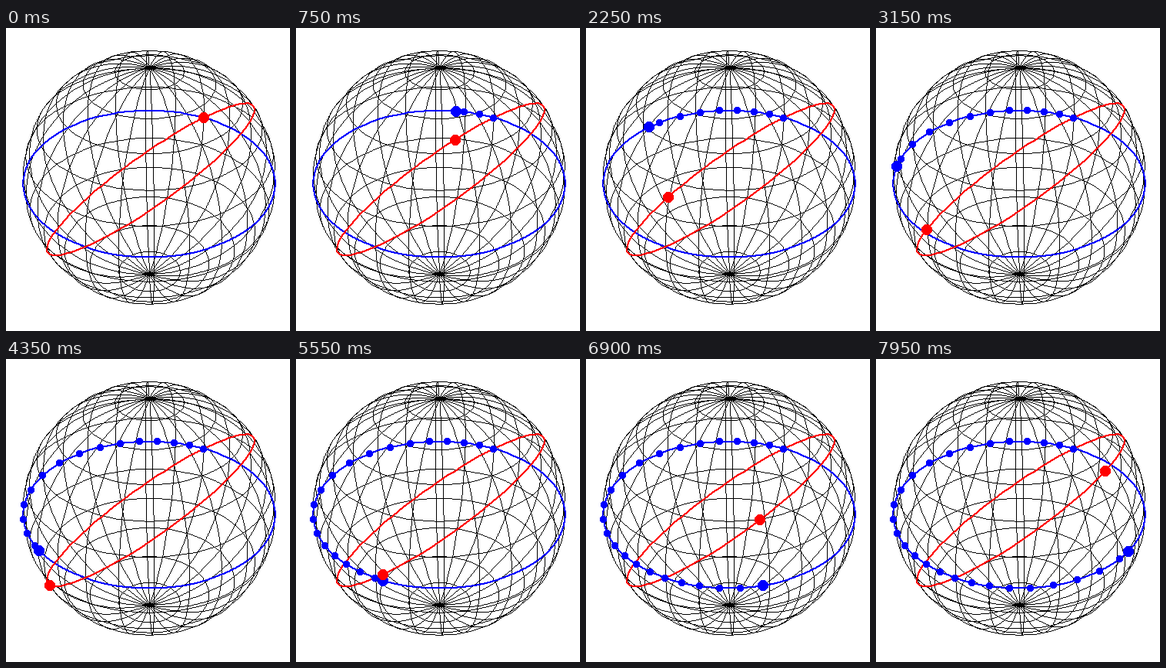
Animation of 369 by 392 pixels, one loop 8000 ms. Source, as a matplotlib script:

```python
import numpy as np
import matplotlib.pyplot as plt
from matplotlib.animation import FuncAnimation

WIDTH, HEIGHT, DPI = 369, 392, 100
CENTER_X, CENTER_Y, RADIUS = 186, 194, 164
DISTANCE = 9                          # camera distance in sphere radii
ELEVATION = np.arctan(np.sqrt(0.5))
NODE = np.radians(-62)                # where ecliptic and equator cross
OBLIQUITY = np.radians(40)
STEP = np.radians(5)
INTERVAL, TICKS_PER_STEP, FRAMES = 50, 3, 160
SMALL_DOT, BIG_DOT = 9, 14
BLUE, RED = "#0000ff", "#ff0000"


def project(lon, lat):
    """Perspective view of a point on the sphere, in stage pixels."""
    right = np.cos(lat) * np.cos(lon)
    front = np.cos(lat) * np.sin(lon)
    up = np.sin(lat)
    s, c = np.sin(ELEVATION), np.cos(ELEVATION)
    depth = c * front + s * up
    scale = RADIUS * np.sqrt(DISTANCE**2 - 1) / (DISTANCE - depth)
    return CENTER_X + scale * right, CENTER_Y - scale * (c * up - s * front)


def ecliptic(angle):
    """Longitude and latitude of the sun after moving by angle."""
    ascension = np.arctan2(np.sin(angle) * np.cos(OBLIQUITY), np.cos(angle))
    latitude = -np.arcsin(np.sin(angle) * np.sin(OBLIQUITY))
    return NODE - ascension, latitude


fig = plt.figure(figsize=(WIDTH / DPI, HEIGHT / DPI), dpi=DPI, facecolor="white")
ax = fig.add_axes([0, 0, 1, 1])
ax.set(xlim=(0, WIDTH), ylim=(HEIGHT, 0))
ax.axis("off")


def pixels(color, points=((), ())):
    """Hard-edged single pixels, one for each point."""
    return ax.plot(*points, ",", color=color, antialiased=False)[0]


def trace(x, y):
    """Pixels of a polyline, one per step along the longer axis."""
    points = np.rint(np.column_stack([x, y]))
    parts = []
    for start, end in zip(points[:-1], points[1:]):
        count = int(abs(end - start).max()) + 1
        parts.append(np.rint(np.linspace(start, end, count)))
    return np.unique(np.concatenate(parts), axis=0).T


def curve(lon, lat, color, width):
    x, y = trace(*project(lon, lat))
    for dx in range(width):
        for dy in range(width):
            pixels(color, (x - dx, y - dy))


def disc(size):
    """Pixel offsets of a filled circle from its top left corner."""
    dx, dy = np.mgrid[:size, :size]
    middle = (size - 1) / 2
    inside = np.hypot(dx - middle, dy - middle) <= size / 2
    return dx[inside], dy[inside]


def place(dots, size, lon, lat):
    x, y = project(np.atleast_1d(lon), np.atleast_1d(lat))
    dx, dy = disc(size)
    left, top = np.rint(x - size / 2), np.rint(y - size / 2)
    dots.set_data(np.add.outer(left, dx).ravel(), np.add.outer(top, dy).ravel())


turn = np.linspace(0, 2 * np.pi, 73)
half = np.linspace(-np.pi / 2, np.pi / 2, 37)
for lon in NODE + np.radians(np.arange(0, 360, 15)):
    curve(lon, half, "black", 1)
for lat in np.radians(np.arange(-75, 90, 15)):
    curve(turn, lat, "black", 1)
curve(turn, 0 * turn, BLUE, 2)
curve(*ecliptic(turn), RED, 2)

trail, shadow, sun = pixels(BLUE), pixels(BLUE), pixels(RED)


def update(frame):
    step = frame // TICKS_PER_STEP
    lon, lat = ecliptic(step * STEP)
    past, _ = ecliptic(np.arange(0, step + 1, 2) * STEP)
    place(trail, SMALL_DOT, past, 0 * past)
    place(shadow, BIG_DOT, lon, 0)
    place(sun, BIG_DOT, lon, lat)
    return trail, shadow, sun


animation = FuncAnimation(fig, update, frames=FRAMES, interval=INTERVAL,
                          repeat=True, repeat_delay=0, blit=False)
plt.show()
```
